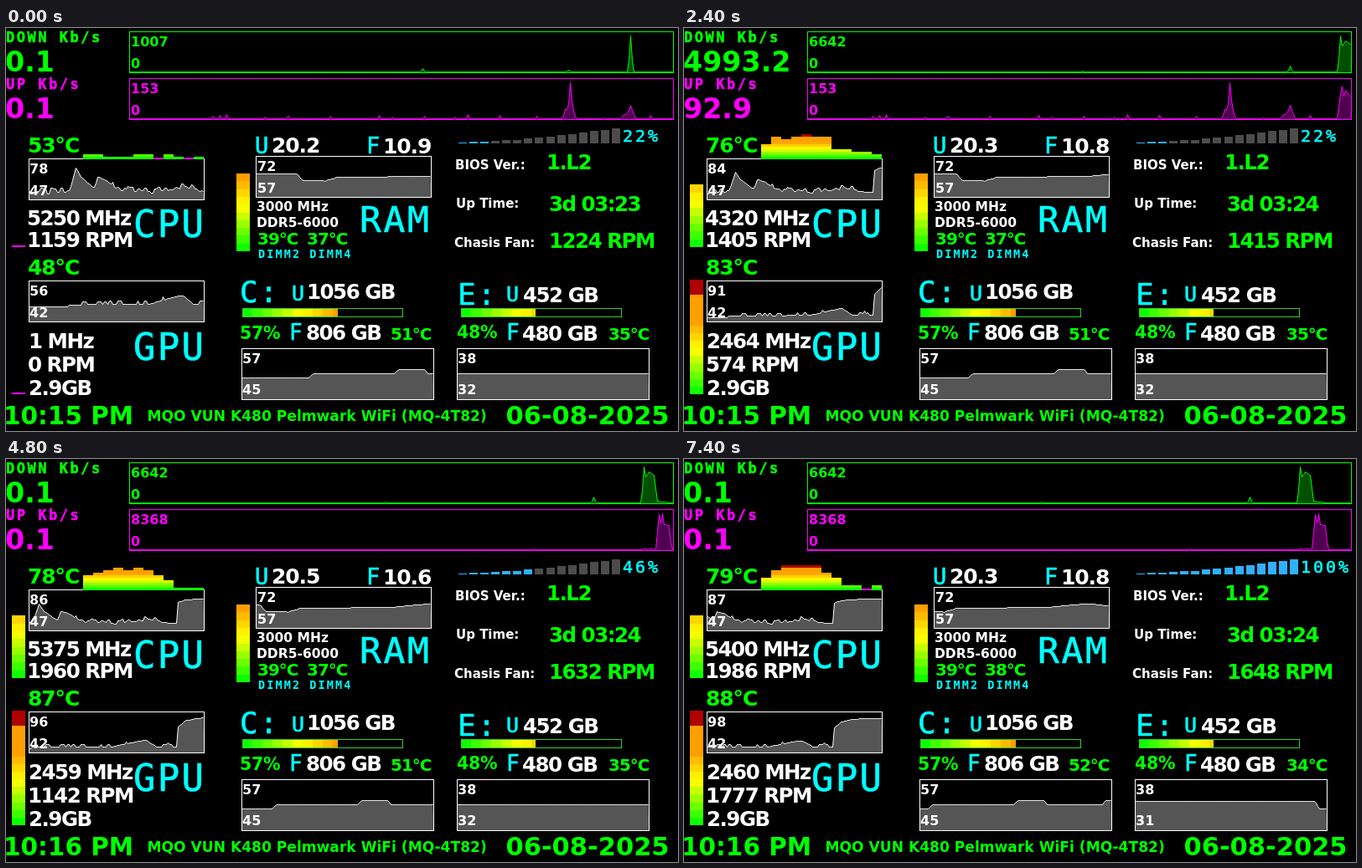
An HTML page that plays this animation: 802x482 px, repeating every 8000 ms.

```html
<!DOCTYPE html>
<html lang="en">
<head>
<meta charset="utf-8">
<title>System monitor</title>
<style>
html, body { margin: 0; width: 100%; height: 100%; overflow: hidden; background: #000; }
svg { display: block; width: 802px; height: 482px; }
rect { shape-rendering: crispEdges; }
text { font-family: "DejaVu Sans", Verdana, sans-serif; font-weight: bold; white-space: pre; }
.big { font-size: 24.5px; letter-spacing: -1.5px; }
.temp { font-size: 25px; letter-spacing: -1.1px; }
.mid { font-size: 20px; letter-spacing: -1px; }
.pct { font-size: 20.5px; letter-spacing: -.3px; }
.small { font-size: 15.5px; }
.label { font-size: 15px; }
.scale { font-size: 16px; }
.rate { font-size: 33.3px; }
.board { font-size: 17.1px; }
.clock { font-size: 29.5px; }
.date { font-size: 30.5px; }
.head, .lcd, .dimm { font-family: "DejaVu Sans Mono", monospace; }
.head { font-size: 17px; letter-spacing: 2.5px; stroke: currentColor; stroke-width: .5px; }
.lcd { font-weight: normal; stroke: #0ff; stroke-width: .6px; }
.dimm { font-size: 13.5px; letter-spacing: 2.1px; }
</style>
</head>
<body>
<svg id="stage" viewBox="0 0 802 482"></svg>
<script>
const GREEN = '#0f0', PINK = '#f0f', CYAN = '#0ff', WHITE = '#fff', GRAY = '#555';
const STEP = 200, LOOP = 8000, LAST = 35, SHIFT = 2;

const mix = (a, b, k) => a + (b - a) * k;
const clamp = k => Math.max(0, Math.min(1, k));
const ramp = (x, from, to) => clamp((x - from) / (to - from));
const rand = seed => {
  const s = Math.sin(seed * 12.9898) * 43758.5453;
  return s - Math.floor(s);
};

// Straight lines through x0, v0, x1, v1, ...
function along(x, ...pts) {
  if (x <= pts[0]) return pts[1];
  for (let i = 2; i < pts.length; i += 2) {
    if (x <= pts[i]) return mix(pts[i - 1], pts[i + 1], ramp(x, pts[i - 2], pts[i]));
  }
  return pts[pts.length - 1];
}
const count = (n, ...pts) => Math.round(along(n, ...pts));
const spike = (x, at, height, width = 3) => height * Math.max(0, 1 - Math.abs(x - at) / width);

// Histories along one long strip that scrolls to the left
function downRate(x) {
  const burst = along(x, 801, 0, 803, 2288.5, 805, 6642, 807, 4700, 811, 5700, 817, 4993.2, 821, 300, 829, 142.5, 835, 0);
  return spike(x, 497, 85) + spike(x, 671, 50) + spike(x, 745, 1007) + burst;
}

function upRate(x) {
  const chatter = x < 790 && rand(x) > .94 ? 18 * rand(x + 1) : 0;
  const peaks = spike(x, 668, 50, 4) + spike(x, 673, 143) + spike(x, 676, 40, 4) + spike(x, 745, 55, 6) + spike(x, 738, 24, 4);
  const burst = along(x, 801, 0, 805, 103, 807, 138, 809, 95, 811, 120, 817, 92.9, 819, 100,
    823, 8100, 825, 6200, 827, 8368, 829, 5859.2, 835, 5500, 838, 0);
  return Math.max(chatter, peaks, burst);
}

function cpuHeat(x) {
  const v = along(x, 75, 48, 83, 78, 89, 67, 105, 53, 109, 67, 117, 64, 131, 54, 147, 49, 171, 48, 205, 55,
    235, 50, 247, 51, 249, 80, 257, 84, 279, 86, 305, 87);
  return v < 57 ? Math.max(47, v - 3 + 9 * rand(Math.floor(x / 4))) : v;
}

function gpuHeat(x) {
  const v = along(x, 73, 42, 75, 44, 171, 45, 207, 56, 211, 56, 223, 45, 233, 45, 237, 52, 241, 45, 247, 45,
    249, 80, 257, 91, 269, 95, 289, 98);
  return v > 43 && v < 53 && rand(Math.floor(x / 3)) > .65 ? v + 4 : v;
}

const ramLine = x => along(x, 347, 174, 353, 182, 380, 183, 397, 178, 455, 178, 508, 177, 540, 174, 558, 173.5, 578, 176);
const diskLine = x => 418 - 5 * (ramp(x, 362, 366) + ramp(x, 464, 468) - ramp(x, 499, 503) + ramp(x, 569, 573));

const text = (x, y, cls, color, str) =>
  `<text x="${x}" y="${y}" class="${cls}" fill="${color}" color="${color}">${str}</text>`;
const lcd = (x, y, size, str, gap = 0) =>
  `<text x="${x}" y="${y}" class="lcd" fill="${CYAN}" style="font-size:${size}px;letter-spacing:${gap}px">${str}</text>`;
const rect = (x, y, w, h, fill) => `<rect x="${x}" y="${y}" width="${w}" height="${h}" fill="${fill}"/>`;
const frame = ([x, y, w, h], color) =>
  `<rect x="${x}" y="${y}" width="${w}" height="${h}" fill="none" stroke="${color}"/>`;

// World positions of the visible samples, two pixels apart
function visible([x, , w], n) {
  const first = Math.floor(x) + SHIFT * n;
  return Array.from({ length: Math.ceil(w / 2) }, (_, i) => first + 2 * i);
}
const peak = (series, box, n) => Math.floor(Math.max(...visible(box, n).map(series)));

function graph(box, n, valueY, line, fill) {
  const [x, y, w, h] = box;
  const pts = visible(box, n).map((wx, i) => `${x + 2 * i},${Math.floor(valueY(wx)) + .5}`).join(' ');
  return `<polygon points="${x},${y + h} ${pts} ${x + w},${y + h}" fill="${fill}"/>` +
    `<polyline points="${pts}" fill="none" stroke="${line}"/>` + frame(box, line);
}

const scale = (x, top, bottom, hi, lo, color = WHITE) =>
  text(x, top, 'scale', color, hi) + text(x, bottom, 'scale', color, lo);

// Green through yellow and orange to red
function heat(i) {
  if (i >= 13) return '#b00000';
  return `rgb(${Math.round(255 * clamp((i + .3) / 5.5))},${Math.round(mix(255, 160, ramp(i, 5.5, 9)))},0)`;
}

function column(x, bottom, segments, size, w = 16, hue = 1) {
  if (!segments) return rect(x, bottom - 2, w, 2, PINK);
  let out = '';
  for (let i = 0; i < segments; i++) out += rect(x, bottom - (i + 1) * size, w, size, heat(i * hue));
  return out;
}

function diskBar(x, filled) {
  let out = '';
  for (let i = 0; i * 12 < filled; i++) out += rect(x + i * 12, 335, Math.min(12, filled - i * 12), 11, heat(i));
  return out + frame([x + .5, 335.5, 191, 10], '#30d030');
}

function network(n, series, y, name, color, fill) {
  const box = [147.5, y, 649, 49], top = peak(series, box, n);
  const now = Math.max(.1, series(visible(box, n).pop()));
  return text(0, y + 12, 'head', color, name) + text(-1, y + 47.5, 'rate', color, now.toFixed(1)) +
    graph(box, n, x => y + 48 - series(x) / top * 43.5, color, fill) +
    scale(149, y + 17.5, y + 43.5, top, 0, color);
}

function networkPanel(n) {
  return network(n, downRate, 4.5, 'DOWN Kb/s', GREEN, '#005000') +
    network(n, upRate, 60.5, 'UP Kb/s', PINK, '#500050');
}

// Idle flicker gives way to a load centred on the first cores
function cores(n) {
  const busy = ramp(n, 4, 7);
  let out = '';
  for (let i = 0; i < 12; i++) {
    const noise = rand(n * 12 + i + 5);
    const idle = noise * (1.2 - i / 12) * (3 + n);
    const load = 1 + 7.5 * Math.exp(-(((i - 3.6) / 4) ** 4)) + 3 * (noise - .4);
    out += column(92 + i * 12, 157, Math.min(10, Math.round(mix(idle, load, busy))), 3, 12, 1.45);
  }
  return out;
}

function staircase(percent) {
  const lit = Math.round(percent * .15);
  let out = '';
  for (let i = 0; i < 15; i++) {
    const h = 1 + 17 * (i / 14) ** 1.7;
    out += rect(540 + i * 13.07, 137.5 - h, 10, h, i < lit ? '#30b0ff' : '#4c4c4c');
  }
  return out + lcd(736, 136, 20, percent + '%', 3);
}

function cpuPanel(n) {
  const box = [27.5, 156.5, 209, 49], top = peak(cpuHeat, box, n);
  const mhz = 5 * count(n, 0, 1050, 4, 1090, 11, 864, 17, 1090, 22, 1075, 30, 1075, 35, 1080);
  return text(26, 149, 'temp', GREEN, count(n, 0, 53, 4, 54, 6, 75, 22, 78, 35, 78.6) + '°C') +
    graph(box, n, x => 198 - (cpuHeat(x) - 47) / (top - 47) * 31, WHITE, GRAY) + cores(n) +
    scale(28, 174, 200, top, 47) + column(7, 262, count(n, 0, 0, 4, 1, 7, 8), 9.35) +
    text(25, 236, 'big', WHITE, mhz + ' MHz') +
    text(25, 262, 'big', WHITE, count(n, 0, 1159, 4, 1186, 11, 1405, 17, 1807, 22, 1960, 35, 1986) + ' RPM') +
    lcd(152, 249.5, 44, 'CPU', 2.2);
}

function gpuPanel(n) {
  const box = [27.5, 302.5, 209, 49], top = peak(gpuHeat, box, n), wide = ramp(top, 56, 91);
  const valueY = x => mix(333, 346, wide) - (gpuHeat(x) - 42) / (top - 42) * mix(13, 36, wide);
  return text(26, 295, 'temp', GREEN, count(n, 0, 48, 4, 50, 7, 78, 11, 83, 17, 86, 25, 88) + '°C') +
    graph(box, n, valueY, WHITE, GRAY) + scale(28, 320, 346, top, 42) +
    column(7, 438, count(n, 0, 0, 4, 2, 7, 15), 9.13) +
    text(27, 383, 'big', WHITE, count(n, 0, 1, 4, 164, 7, 2464, 11, 2464, 17, 2430, 22, 2459, 30, 2431, 35, 2460) + ' MHz') +
    text(26, 411, 'big', WHITE, count(n, 4, 0, 11, 574, 17, 802, 22, 1142, 30, 1665, 35, 1777) + ' RPM') +
    text(27, 439, 'big', WHITE, '2.9GB') + lcd(152, 396.5, 44, 'GPU', 2.2);
}

function ramPanel(n) {
  const used = count(n, 4, 202, 22, 205, 35, 203);
  return lcd(297, 150, 27, 'U') + text(317, 149, 'temp', WHITE, (used / 10).toFixed(1)) +
    lcd(430, 150, 27, 'F') + text(450, 150, 'temp', WHITE, ((311 - used) / 10).toFixed(1)) +
    graph([298.5, 153.5, 209, 49], n, ramLine, WHITE, GRAY) + scale(300, 171, 197, 72, 57) +
    column(275, 267, 10, 9.3) + text(299, 219, 'small', WHITE, '3000 MHz') +
    text(299, 238, 'small', WHITE, 'DDR5-6000') + text(300, 259, 'mid', GREEN, '39°C') +
    text(359, 259, 'mid', GREEN, (n > 32 ? 38 : 37) + '°C') +
    text(301, 275, 'dimm', CYAN, 'DIMM2 DIMM4') + lcd(422, 244, 43, 'RAM', 2.6);
}

function diskPanels(n) {
  const cooled = n >= 29;
  const lineE = x => cooled ? mix(409, 418, ramp(x, 823, 827)) : 413;
  return lcd(279, 328, 36, 'C:', 2) + lcd(341, 326, 25, 'U') + text(359, 324, 'big', WHITE, '1056 GB') +
    diskBar(282, 114) + text(279, 372, 'pct', GREEN, '57%') + lcd(338, 373, 26, 'F') +
    text(358, 373, 'big', WHITE, '806 GB') + text(459, 373, 'mid', GREEN, (n > 27 ? 52 : 51) + '°C') +
    graph([281.5, 383.5, 229, 61], n, diskLine, WHITE, GRAY) + scale(282, 401, 438, 57, 45) +
    lcd(539, 331, 36, 'E:', 2) + lcd(597, 327, 25, 'U') + text(617, 328, 'big', WHITE, '452 GB') +
    diskBar(543, 89) + text(538, 371, 'pct', GREEN, '48%') + lcd(597, 373, 26, 'F') +
    text(616, 374, 'big', WHITE, '480 GB') + text(719, 373, 'mid', GREEN, (cooled ? 34 : 35) + '°C') +
    graph([538.5, 383.5, 229, 61], n, lineE, WHITE, GRAY) + scale(539, 401, 438, 38, cooled ? 31 : 32);
}

function systemPanel(n) {
  return staircase(Math.round(mix(22, 100, clamp((n - 17) * .0615)))) +
    text(536, 169, 'label', WHITE, 'BIOS Ver.:') + text(645, 169, 'big', GREEN, '1.L2') +
    text(537, 215, 'label', WHITE, 'Up Time:') + text(648, 219, 'big', GREEN, n < 7 ? '3d 03:23' : '3d 03:24') +
    text(535, 262, 'label', WHITE, 'Chasis Fan:') +
    text(648, 263, 'big', GREEN, count(n, 0, 1224, 4, 1228, 11, 1415, 17, 1626, 35, 1648) + ' RPM') +
    text(-3, 474, 'clock', GREEN, n < 20 ? '10:15 PM' : '10:16 PM') +
    text(168.5, 470, 'board', GREEN, 'MQO VUN K480 Pelmwark WiFi (MQ-4T82)') +
    text(596.5, 474, 'date', GREEN, '06-08-2025');
}

const stage = document.getElementById('stage');
const panels = [networkPanel, cpuPanel, gpuPanel, ramPanel, diskPanels, systemPanel];
const start = performance.now();
let shown = -1;

// The readings pause for one step at 800 ms and at 2800 ms
function tickAt(ms) {
  const step = Math.floor(ms / STEP);
  return Math.min(LAST, step - (step >= 4) - (step >= 14));
}

function update() {
  const n = tickAt(Math.max(0, performance.now() - start) % LOOP);
  if (n !== shown) {
    stage.innerHTML = panels.map(panel => panel(n)).join('');
    shown = n;
  }
  requestAnimationFrame(update);
}
update();
</script>
</body>
</html>
```
